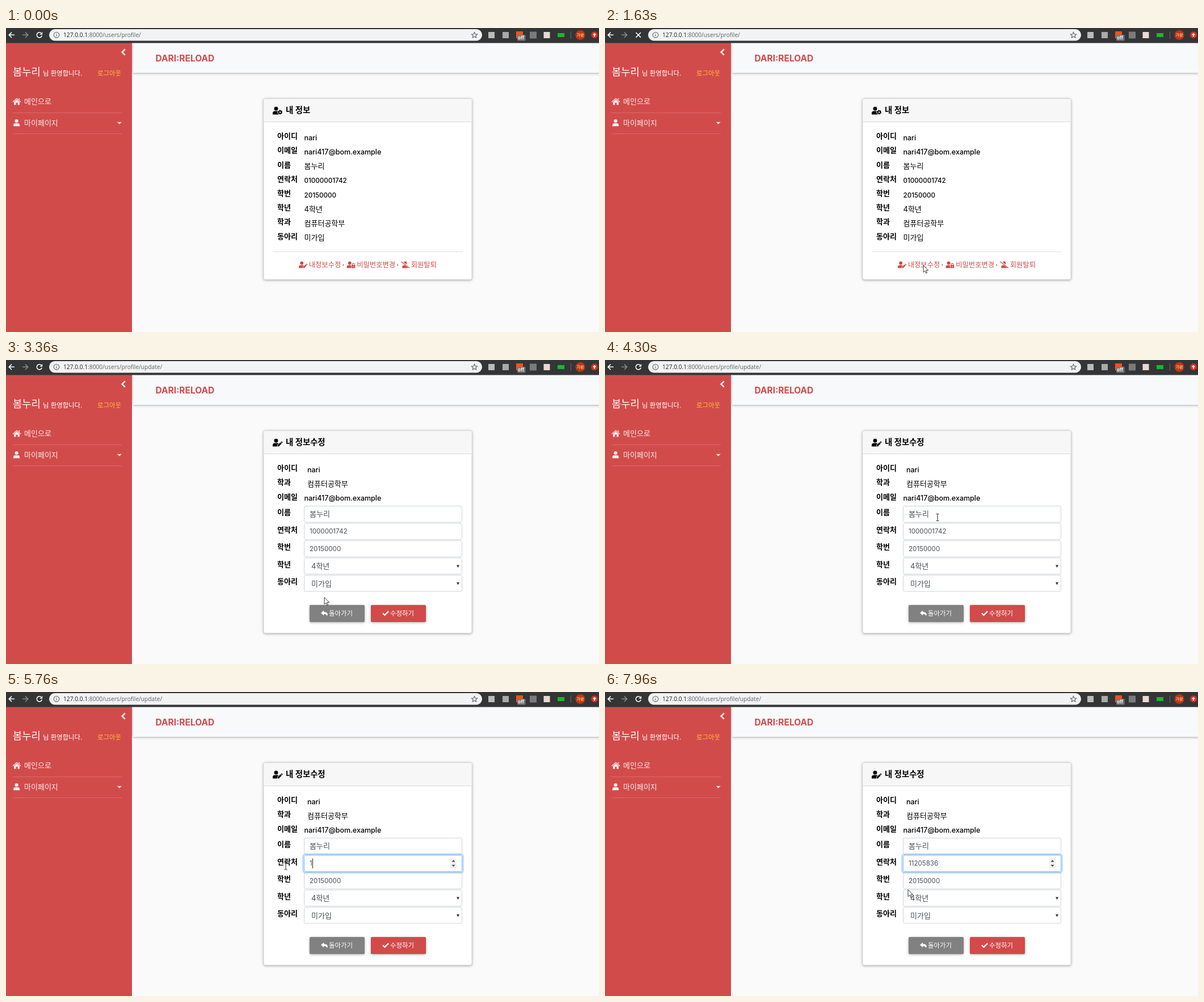
These frames come from a looping animation (1045x536 px, 8 s). An HTML page:

```html
<!DOCTYPE html>
<html lang="ko">
<head>
<meta charset="utf-8">
<title>내 정보</title>
<style>
html, body { margin: 0; width: 100%; height: 100%; overflow: hidden; background: #fafafa; }
svg { display: block; width: 1045px; height: 536px; color: #000; --gap: #fff; }
text { font: 13px Inter, "Noto Sans CJK KR", "Noto Sans CJK", sans-serif; fill: currentColor; white-space: pre; }
.b { font-weight: 700; }
.en { font-size: 12.5px; font-weight: 500; }
.num { font-size: 11.6px; font-weight: 500; }
.field { color: #495057; }
.field .num { font-weight: 400; }
.title { font-size: 14.4px; font-weight: 700; }
.link { font-size: 12.3px; }
.small { font-size: 11.4px; }
.red { color: #d24a4a; }
.white { color: #fff; }
.url text { font: 10.2px "Open Sans", "Noto Sans", sans-serif; color: #5f6368; }
.box { fill: #fff; stroke: #ced4da; }
.shadow { filter: drop-shadow(0 1px 2px rgba(0, 0, 0, .32)); }
.line { fill: none; stroke: currentColor; stroke-width: 1.6; }
.thick { stroke-width: 2.4; }
</style>
</head>
<body>
<svg viewBox="0 0 1045 536">
  <defs>
    <g id="user" fill="currentColor">
      <circle cx="7" cy="4" r="4"/>
      <path d="M0 16v-2.4a4.4 4.4 0 0 1 4.4-4.4h5.2a4.4 4.4 0 0 1 4.4 4.4V16z"/>
    </g>
    <g id="cog">
      <use href="#user"/>
      <circle cx="15.3" cy="11.4" r="5.4" fill="var(--gap)"/>
      <circle cx="15.3" cy="11.4" r="2.7" fill="none" stroke="currentColor" stroke-width="2.4"/>
      <circle cx="15.3" cy="11.4" r="4" fill="none" stroke="currentColor" stroke-width="1.4" stroke-dasharray="2.1 2.09"/>
    </g>
    <g id="edit">
      <use href="#user"/>
      <path d="M10 16l.6-3.2 5.6-5.5 2.5 2.5-5.6 5.6zM17 6.6l.8-.8q.7-.6 1.4 0l1 1q.6.7 0 1.4l-.8.8z"
        fill="currentColor" stroke="var(--gap)" stroke-width="1.8" paint-order="stroke"/>
    </g>
    <g id="lock">
      <use href="#user"/>
      <rect x="11.4" y="8.8" width="8.6" height="7.2" rx="1" fill="currentColor" stroke="var(--gap)" stroke-width="1.8" paint-order="stroke"/>
      <path class="line" d="M13.3 9V7.2a2.4 2.4 0 0 1 4.8 0V9"/>
      <circle cx="15.7" cy="12.4" r="1.1" fill="var(--gap)"/>
    </g>
    <g id="slash">
      <use href="#user" x="3"/>
      <path d="M1 .2L20 15" stroke="var(--gap)" stroke-width="4"/>
      <path d="M.8 .8L19.4 15.2" stroke="currentColor" stroke-width="1.7" stroke-linecap="round"/>
    </g>
    <g id="spin">
      <rect x="783" y="-9" width="11" height="18" fill="#f0f0f0"/>
      <path d="M785.5-2.5h6l-3-3.4zM785.5 2.7h6l-3 3.4z" fill="#444"/>
    </g>
  </defs>

  <rect width="1045" height="536" fill="#fafafa"/>
  <g class="shadow"><rect x="224" y="26" width="830" height="53" fill="#f8f9fb"/></g>
  <text class="red b" x="263.5" y="58.5" style="font-size:15.5px">DARI:RELOAD</text>

  <rect y="26" width="222" height="510" fill="#d24b4b"/>
  <g class="white">
    <path class="line thick" d="M209.8 37.3l-5.2 5.2 5.2 5.2"/>
    <text x="12" y="83.5" style="font-size:17.7px">봄누리</text>
    <text x="65" y="83.5" class="small">님 환영합니다.</text>
    <text x="161" y="83.5" class="small" style="fill:#ffc038">로그아웃</text>
    <g opacity=".88">
      <path d="M11.5 130l7.5-6.5 7.5 6.5-.8.9-6.7-5.8-6.7 5.8zM14 130.4l5-4.3 5 4.3v5h-3.5v-3.6h-3v3.6H14zM22.6 124h1.6v3l-1.6-1.4z" fill="currentColor"/>
      <text x="32" y="134">메인으로</text>
      <use href="#user" transform="translate(13 161) scale(.8 .76)"/>
      <text x="32" y="172">마이페이지</text>
      <path d="M195.8 165.8h8l-4 4z" fill="currentColor"/>
    </g>
    <path d="M12 149.5h192M12 186.5h192" stroke="#fff" stroke-opacity=".17"/>
  </g>

  <rect width="1045" height="26.5" fill="#343537"/>
  <rect x="76" y="2" width="763" height="20.5" rx="10.2" fill="#f1f3f4"/>
  <g class="white">
    <path class="line" d="M15 12.3H5.5M10 7.6l-4.7 4.7 4.7 4.7"/>
    <path class="line" d="M29 12.3h9.5M34 7.6l4.7 4.7-4.7 4.7" style="stroke:#88898b"/>
    <g id="reload">
      <path class="line" d="M62.3 9.2a4.6 4.6 0 1 0 1 4.4"/>
      <path d="M64.2 7v4.8h-4.8z" fill="#fff"/>
    </g>
    <path id="stop" class="line" d="M54.5 8l8.6 8.6M63.1 8l-8.6 8.6"/>
  </g>
  <g fill="none" stroke="#5f6368" stroke-width="1.1">
    <circle cx="89" cy="12.3" r="4.8"/>
    <path d="M89 11.6v3.2M89 9.4v1.2"/>
    <path d="M825.5 7.4l1.5 3.3 3.6.4-2.7 2.4.8 3.5-3.2-1.8-3.2 1.8.8-3.5-2.7-2.4 3.6-.4z"/>
  </g>
  <g class="url"><text x="101" y="16"><tspan fill="#202124">127.0.0.1</tspan>:8000/users/profile/<tspan id="path"></tspan></text></g>
  <rect x="850" y="7" width="11" height="11" fill="#b9bcb8"/>
  <rect x="875" y="7" width="11" height="11" fill="#a9a9a9"/>
  <rect x="899" y="6" width="12" height="12" fill="#f4511e"/>
  <rect x="901" y="12" width="14.5" height="10.5" rx="1.5" fill="#777"/>
  <text class="white" x="902.3" y="20.2" style="font-size:8px;font-weight:600">off</text>
  <rect x="923" y="6.5" width="12" height="12" fill="#7b7b7b"/>
  <rect x="947.5" y="7" width="11" height="11" fill="#e9d9d2"/>
  <rect x="972" y="9" width="12" height="7" fill="#1cb52c"/>
  <path d="M995.5 6v13" stroke="#68696b"/>
  <circle cx="1012" cy="12.3" r="8.6" fill="#bf360c"/>
  <text class="white" x="1012" y="15" text-anchor="middle" style="font-size:7px">가람</text>
  <circle cx="1037" cy="12.3" r="6" fill="#d93025"/>
  <path d="M1037 8.8l3.2 3.5h-2.1v3h-2.2v-3h-2.1z" fill="#fff"/>

  <g id="view"></g>
  <g id="edit-view"></g>

  <g id="cursor">
    <path id="arrow" d="M0 .5v12.2l2.8-2.6 1.9 4.3 2-.9-1.9-4.2h3.9z" fill="#fff" stroke="#222" stroke-width=".9"/>
    <path id="hand" d="M-1.3 10.5V1.8a1.3 1.3 0 0 1 2.6 0V7q1.2-1 2.1.3 1.3-.8 2 .4 1.7-.4 1.8 1.2v4q-.1 2.1-1.2 3.6v1.2h-6.4v-1.2q-2.2-2-4-5.3-.6-1.6.6-1.7 1.2 0 2.5 1.9zM1.3 7v3M3.4 7.5v2.5M5.4 8v2.2" fill="#fff" stroke="#222" stroke-width=".9"/>
    <path id="beam" d="M-2.5-6H-.6L0-5.5.6-6H2.5M0-5.5v11M-2.5 6H-.6L0 5.5.6 6H2.5" fill="none" stroke="#222"/>
  </g>
</svg>
<script>
const $ = id => document.getElementById(id);
const text = (x, y, s, cls = '') => `<text x="${x}" y="${y}" class="${cls}">${s}</text>`;
const icon = (name, x, y, k) => `<use href="#${name}" transform="translate(${x} ${y}) scale(${k})"/>`;
const style = s => s.match(/[a-z]/) ? 'en' : s.match(/^\d+$/) ? 'num' : '';

const card = (h, name, title) => `
  <g class="shadow"><rect x="454" y="124.5" width="367" height="${h}" rx="3" fill="#fff" stroke="#d5d5d5"/></g>
  <path d="M454.5 165V127.5a2.5 2.5 0 0 1 2.5-2.5h361a2.5 2.5 0 0 1 2.5 2.5V165z" fill="#f7f7f7"/>
  <path d="M454.5 165.5h366" stroke="#d9d9d9"/>
  <g style="--gap:#f7f7f7">${icon(name, 470, 138.8, .85)}</g>` + text(493, 150, title, 'title');

const person = '봄누리', login = 'nari', mail = 'nari417@bom.example', dept = '컴퓨터공학부';
const info = [['아이디', login], ['이메일', mail], ['이름', person], ['연락처', '01000001742'],
  ['학번', '20150000'], ['학년', '4학년'], ['학과', dept], ['동아리', '미가입']];

$('view').innerHTML = card(319, 'cog', '내 정보') +
  info.map(([k, v], i) => text(478, 195.2 + 25.2 * i, k, 'b') + text(525.5, 197.7 + 25.2 * i, v, style(v))).join('') +
  `<path d="M470 394.5h335" stroke="#dfdfdf"/><g class="red">` +
  [['edit', 516, '내정보수정'], ['lock', 600.5, '비밀번호변경'], ['slash', 696, '회원탈퇴']].map(([n, x, s]) =>
    icon(n, x, 411.5, .74) + text(x + 17.7, 421.5, s, 'link')).join('') +
  '</g>' + text(592.5, 421.5, '·', 'link') + text(688.5, 421.5, '·', 'link');

const rows = [['이름', person], ['연락처', ''], ['학번', '20150000'], ['학년', '4학년'], ['동아리', '미가입']];
const button = (x, fill, s, mark) => `
  <g class="shadow"><rect x="${x}" y="432" width="97" height="30" rx="2" fill="${fill}"/></g>
  <g class="white">${mark}${text(x + 34, 450.8, s, 'small')}</g>`;

$('edit-view').innerHTML = card(357, 'edit', '내 정보수정') +
  [['아이디', login, 531], ['학과', dept, 531], ['이메일', mail, 525.5]].map(([k, v, x], i) =>
    text(478, 195.2 + 25.2 * i, k, 'b') + text(x, 197.7 + 25.2 * i, v, style(v))).join('') +
  rows.map(([k, v], i) => {
    const y = 257.5 + 30.5 * i, select = i > 2;
    return text(478, y + 15.8, k, 'b') +
      `<rect class="box" x="525.5" y="${y}" width="278" height="28.5" rx="2.5"${i == 1 ? ' id="phone"' : ''}/>
      <g class="field">${text(select ? 538 : 535, y + (select ? 19.4 : 18.6), v, style(v))}</g>` +
      (select ? `<path d="M794 ${y + 12.6}h5l-2.5 4.6z" fill="#333"/>` : '');
  }).join('') + `
  <rect id="ring" x="523.5" y="286" width="282" height="32.5" rx="4" fill="none" stroke="#007bff" stroke-opacity=".28" stroke-width="2.6"/>
  <use href="#spin" id="spin1" y="302"/><use href="#spin" id="spin2" y="332.5"/>
  <rect id="mark" y="293" height="18" fill="#3390ff"/>
  <g class="field"><text class="num" x="535" y="306.4" id="num"><tspan id="plain"></tspan><tspan id="picked" fill="#fff"></tspan></text></g>
  <path id="caret" d="M0 293.5v17.5" stroke="#222"/>` +
  button(535, '#818181', '돌아가기', '<path d="M555 446l5-4.4v2.6q6.8 0 6.8 4.3 0 1.6-1.8 3.1.9-3.8-5-3.7v2.6z" fill="#fff"/>') +
  button(643, '#d24a4a', '수정하기', '<path class="line thick" d="M664 446.5l3.4 3.4 6.8-6.8"/>');

const moves = [[500, 975, 506], [800, 720, 452], [1100, 576, 422], [1230, 561, 418], [3500, 561, 418],
  [4160, 587, 278], [4300, 586, 277.5], [4440, 586, 277.5], [4760, 603, 302], [4960, 604, 304],
  [5033, 519, 305.5], [5100, 493, 307], [7560, 493, 307], [7960, 534, 348]];
const old = '1000001742', typed = '11205836';
const strokes = [5760, 5830, 5900, 6230, 6560, 6700, 6900, 7030];

const show = (id, on) => $(id).style.display = on ? '' : 'none';

function pointer(t) {
  const i = moves.findIndex(m => m[0] > t);
  if (i < 0) return moves[moves.length - 1].slice(1);
  if (!i) return moves[0].slice(1);
  const [a, x, y] = moves[i - 1], [b, u, v] = moves[i], k = (t - a) / (b - a);
  return [x + (u - x) * k, y + (v - y) * k];
}

function draw(t) {
  // the pointer is seen at 15 samples a second
  const [x, y] = pointer(Math.floor((t - 26) / 66.667) * 66.667 + 33.4);
  const editing = t >= 3360, loading = t >= 1560 && t < 3300;
  show('view', !editing);
  show('edit-view', editing);
  show('reload', !loading);
  show('stop', loading);
  $('path').textContent = t >= 2360 ? 'update/' : '';

  const inside = top => x >= 525 && x <= 804 && y >= top && y <= top + 29;
  const hand = !editing && x < 592 && y < 424 && !(t >= 1560 && t < 2030);
  const beam = editing && (x < 525 || inside(257) || inside(287.5) || inside(318)) && y < 347.5;
  show('cursor', t >= 500);
  show('hand', hand);
  show('beam', beam);
  show('arrow', !hand && !beam);
  $('cursor').setAttribute('transform', `translate(${x.toFixed(1)} ${y.toFixed(1)})`);
  if (!editing) return;

  const focus = Math.max(0, Math.min(1, (t - 4950) / 150));
  $('ring').style.opacity = focus;
  $('phone').style.stroke = focus ? '#80bdff' : '';
  show('spin1', focus > 0 || inside(287.5));
  show('spin2', inside(318));

  const n = strokes.filter(s => t >= s).length;
  const value = n ? typed.slice(0, n) : old;
  const from = n || t < 5030 ? value.length : t < 5100 ? 5 : 0;
  $('plain').textContent = value.slice(0, from);
  $('picked').textContent = value.slice(from);
  const end = 535 + $('num').getComputedTextLength();
  const start = from ? 535 + $('plain').getComputedTextLength() : 535;
  $('mark').setAttribute('x', start);
  $('mark').setAttribute('width', Math.max(0, end - start));
  show('caret', from == value.length && t >= 4960 && t < 7560);
  $('caret').setAttribute('transform', `translate(${Math.round(end) + .5} 0)`);
}

const begin = performance.now();
function tick() {
  draw((performance.now() - begin) % 8000);
  requestAnimationFrame(tick);
}
tick();
</script>
</body>
</html>
```
